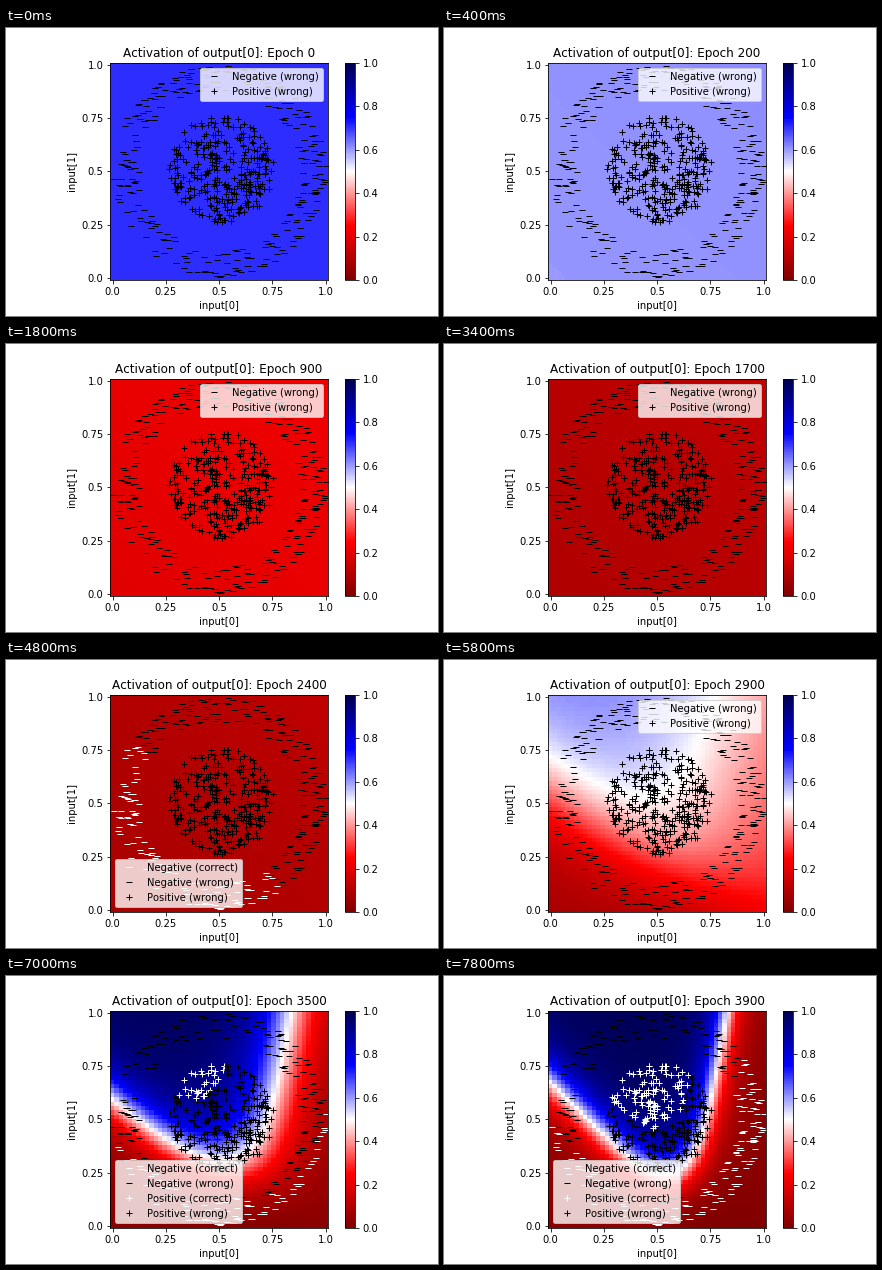
A matplotlib script for the animation above (8 s loop, 432 by 288 pixels).

```python
import numpy as np
import matplotlib.pyplot as plt
from matplotlib.animation import FuncAnimation

FRAMES, INTERVAL, EPOCHS = 40, 200, 100
CELLS = 50
TOL = 0.1
ONSET = 24  # step at which the output starts to separate the classes
rng = np.random.default_rng(12)


def sig(z):
    return 1 / (1 + np.exp(-z))


def smooth(t):
    t = np.clip(t, 0, 1)
    return t * t * (3 - 2 * t)


def activation(x, y, step):
    # The output first collapses to a low, nearly flat plane.
    flat = -2.21 + 3.08 * np.exp(-(step / 7.6) ** 1.4)
    flat = flat + 0.25 * min(step / ONSET, 1) * (x + y - 0.93)

    # Then two hidden units grow and bound the positive region.
    w = max(0, (step - ONSET) / (FRAMES - 1 - ONSET))
    g = smooth(1.2 * w)
    h1 = sig(6.3 * (y + (0.56 + 0.42 * w) * x - 0.34 - 0.33 * w))
    h2 = sig((4.5 + 6.5 * w ** 6) * (0.65 - x + 0.18 * y))
    grown = 8 * g * h1 + 8 * g ** 1.6 * h2 - 12 * g ** 1.55
    return sig((1 - g) * flat + grown)


def ring(n, inner, outer, center):
    radius = np.sqrt(rng.uniform(inner ** 2, outer ** 2, n))
    angle = rng.uniform(0, 2 * np.pi, n)
    return center + radius * np.array([np.cos(angle), np.sin(angle)])


negative = ring(310, 0.38, 0.5, 0.503)
cluster = np.array([[0.63], [0.43]]) + rng.normal(0, 0.03, (2, 25))
positive = np.hstack([ring(290, 0, 0.25, 0.512), cluster])

plt.rcParams.update({"font.family": "DejaVu Sans", "font.size": 10,
                     "text.kerning_factor": 6})
fig, ax = plt.subplots(figsize=(6, 4), dpi=72)
fig.subplots_adjust(left=0.125, right=0.9, bottom=0.125, top=0.88)

axis = np.linspace(0, 1, CELLS)
gx, gy = np.meshgrid(axis, axis)
half = 0.5 / (CELLS - 1)
image = ax.imshow(activation(gx, gy, 0), cmap="seismic_r", vmin=0, vmax=1,
                  origin="lower", interpolation="nearest",
                  extent=(-half, 1 + half, -half, 1 + half))
fig.colorbar(image, ax=ax)

ticks = np.linspace(0, 1, 5)
labels = [str(t) for t in ticks]
ax.set_xticks(ticks, labels)
ax.set_yticks(ticks, labels)
ax.set_xlabel("input[0]")
ax.set_ylabel("input[1]")
title = ax.set_title("")
ax.autoscale(False)


def marks(color, marker, label):
    return ax.plot([], [], color=color, marker=marker, ls="", label=label)[0]


groups = [
    (points, target, marks("w", marker, f"{name} (correct)"),
     marks("k", marker, f"{name} (wrong)"))
    for points, target, marker, name in ((negative, 0, "_", "Negative"),
                                         (positive, 1, "+", "Positive"))
]


def update(step):
    image.set_data(activation(gx, gy, step))
    title.set_text(f"Activation of output[0]: Epoch {step * EPOCHS}")
    shown, any_right = [], False
    for points, target, right, wrong in groups:
        ok = np.abs(activation(*points, step) - target) < TOL
        any_right |= bool(ok.any())
        for line, mask in ((right, ok), (wrong, ~ok)):
            line.set_data(*points[:, mask])
            if mask.any():
                shown.append(line)
    ax.legend(handles=shown, loc="lower left" if any_right else "upper right")
    return []


anim = FuncAnimation(fig, update, frames=FRAMES, interval=INTERVAL,
                     init_func=lambda: update(0), repeat=True, repeat_delay=0)
plt.show()
```
